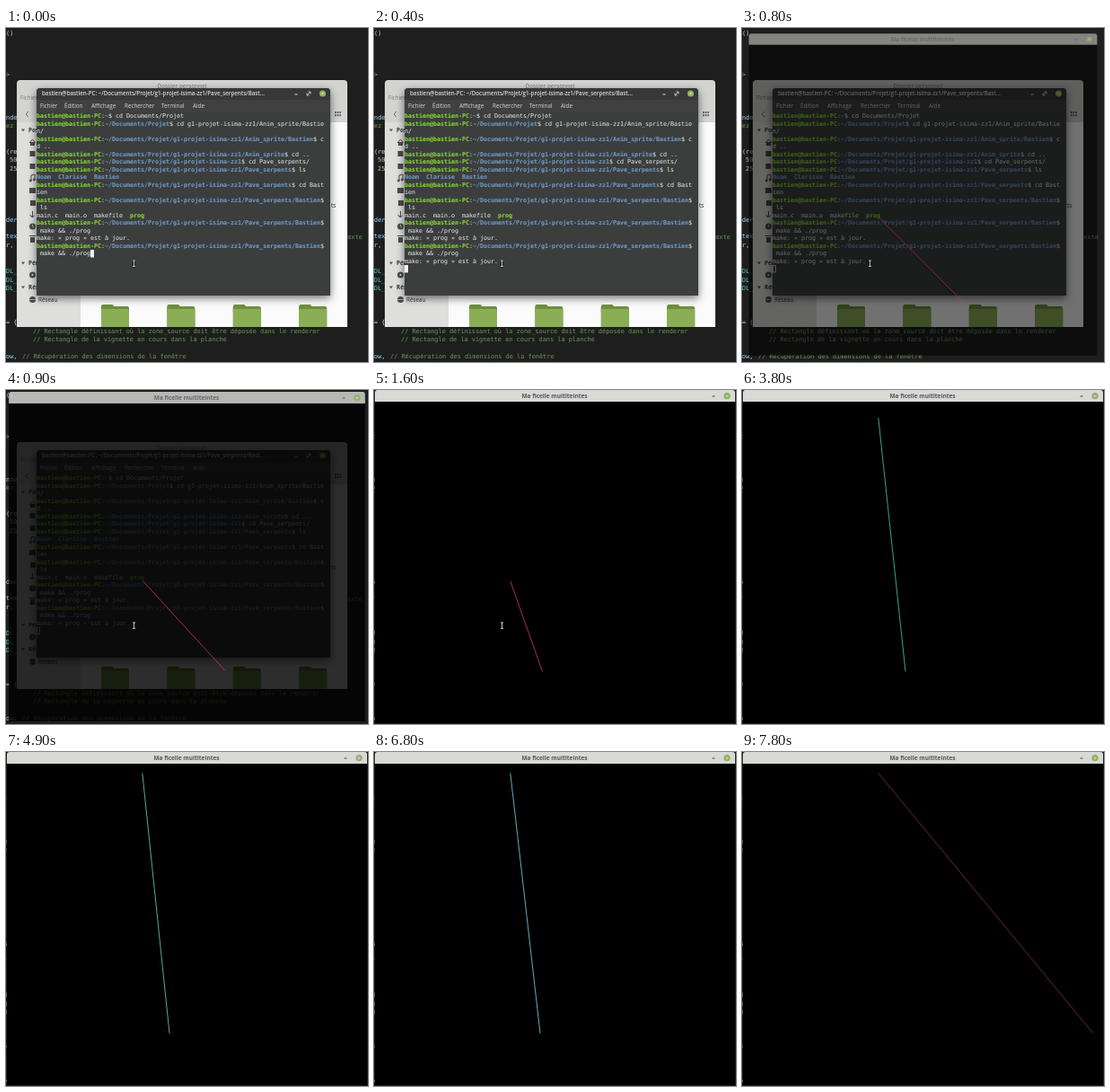
Write an HTML page with a canvas that moves like this. It is 403 by 372 pixels and loops after 8 s.

```html
<!DOCTYPE html>
<html lang="fr">
<head>
<meta charset="utf-8">
<title>Ma ficelle multiteintes</title>
<style>
html, body { margin: 0; width: 100%; height: 100%; overflow: hidden; background: #1e1e1e; }
canvas { display: block; width: 100vw; height: 100vh; }
</style>
</head>
<body>
<canvas id="stage"></canvas>
<script>
const W = 403, H = 372, LOOP = 8000, STEP = 100;
const canvas = document.getElementById('stage');
const ctx = canvas.getContext('2d');
const dpr = window.devicePixelRatio || 1;
canvas.width = Math.round(W * dpr);
canvas.height = Math.round(H * dpr);

const MONO = '"DejaVu Sans Mono", monospace';
const UI = '"Open Sans", sans-serif';
const WHITE = '#eeeeec', GREEN = '#8ae234', BLUE = '#729fcf';

function rect(x, y, w, h, color) {
  ctx.fillStyle = color;
  ctx.fillRect(x, y, w, h);
}

function panel(x, y, w, h, color, radii) {
  ctx.fillStyle = color;
  ctx.beginPath();
  ctx.roundRect(x, y, w, h, radii);
  ctx.fill();
}

function disc(x, y, r, color) {
  ctx.fillStyle = color;
  ctx.beginPath();
  ctx.arc(x, y, r, 0, Math.PI * 2);
  ctx.fill();
}

function stroke(points, color, width = 1) {
  ctx.strokeStyle = color;
  ctx.lineWidth = width;
  ctx.beginPath();
  points.forEach(([x, y]) => ctx.lineTo(x, y));
  ctx.stroke();
}

function label(str, x, y, color, font, align = 'left') {
  ctx.font = font;
  ctx.fillStyle = color;
  ctx.textAlign = align;
  ctx.textBaseline = 'middle';
  ctx.fillText(str, x, y);
}

// Piecewise linear value from [time, value...] keys
function track(keys, t) {
  let i = 0;
  while (i < keys.length - 1 && keys[i + 1][0] <= t) i++;
  const a = keys[i], b = keys[i + 1] || a;
  const k = b === a ? 0 : Math.max(0, (t - a[0]) / (b[0] - a[0]));
  return a.slice(1).map((v, n) => v + (b[n + 1] - v) * k);
}

function closeButton(x, y, color) {
  disc(x, y, 3.6, color);
  stroke([[x - 1.2, y - 1.2], [x + 1.2, y + 1.2]], '#f4f4f0', 0.7);
  stroke([[x + 1.2, y - 1.2], [x - 1.2, y + 1.2]], '#f4f4f0', 0.7);
}

function drawEditor() {
  rect(0, 0, W, H, '#1e1e1e');
  const code = [
    ['()', 0, 6, '#d4d4d4'], ['>', 0, 52, '#ce9178'],
    ['nde', 0, 100, '#9cdcfe'], ['ez', 0, 109, '#6a9955'],
    ['(re', 0, 138, '#d4d4d4'], ['50', 4, 147, '#b5cea8'], ['25', 4, 157, '#b5cea8'],
    ['der', 0, 214, '#9cdcfe'], ['tex', 0, 232, '#9cdcfe'], ['r,', 0, 242, '#9cdcfe'],
    ['DL_', 0, 271, '#4ec9b0'], ['DL_', 0, 281, '#4ec9b0'], ['DL_', 0, 290, '#4ec9b0'],
    ['texte', 376, 233, '#6a9955'], ['= {', 0, 328, '#d4d4d4'],
    ['// Rectangle définissant où la zone_source doit être déposée dans le renderer', 30, 338, '#6a9955'],
    ['// Rectangle de la vignette en cours dans la planche', 30, 347, '#6a9955'],
    ['ow,', 0, 366, '#9cdcfe'],
    ['// Récupération des dimensions de la fenêtre', 18, 366, '#6a9955']
  ];
  for (const [str, x, y, color] of code) label(str, x, y, color, '6.9px ' + MONO);
}

function drawFiles() {
  panel(12, 58, 368, 275, '#d3d3d1', [4, 4, 0, 0]);
  label('Dossier personnel', 196, 65, '#8a8a8a', '600 6.3px ' + UI, 'center');
  label('Fichier', 16, 78, '#777', '6.2px ' + UI);
  rect(12, 105, 71, 228, '#dededd');
  rect(83, 105, 297, 228, '#fbfbfb');
  for (let i = 0; i < 6; i++) rect(366 + i % 3 * 2.6, 93 + (i > 2) * 3.2, 1.6, 2, '#555');
  stroke([[25, 93], [22, 96], [25, 99]], '#666');
  label('ts', 362, 198, '#333', '6.3px ' + UI);

  [[114, 'Poste'], [262, 'Périphériques'], [289, 'Réseau']].forEach(([y, name]) => {
    ctx.fillStyle = '#555';
    ctx.beginPath();
    ctx.moveTo(17, y - 1.5);
    ctx.lineTo(21, y - 1.5);
    ctx.lineTo(19, y + 1.5);
    ctx.fill();
    label(name, 25, y, '#333', '700 6.3px ' + UI);
  });

  const dark = '#4b4b4b';
  stroke([[26, 128], [29.5, 124], [33, 128]], dark);
  rect(27, 127, 5, 4, dark);
  rect(26.5, 137, 6, 6, dark);
  rect(26.5, 151, 6, 6, dark);
  stroke([[28, 170], [28, 164], [32, 163], [32, 169]], dark);
  disc(27.3, 170, 1.4, dark);
  disc(31.3, 169, 1.4, dark);
  rect(26, 178, 7, 6, dark);
  rect(27, 192, 6, 6, dark);
  stroke([[29.5, 204], [29.5, 211], [27, 208.5], [29.5, 211], [32, 208.5]], dark);
  disc(29.5, 221, 3.5, dark);
  stroke([[29.5, 219], [29.5, 221], [31, 222]], '#dededd', 0.7);
  rect(27, 233, 5, 6, dark);
  rect(26, 231, 7, 1, dark);
  disc(29.5, 275, 3.5, dark);
  disc(29.5, 275, 1, '#dededd');
  disc(29.5, 302.5, 3.5, dark);
  stroke([[26, 302.5], [33, 302.5]], '#dededd', 0.6);
  label('Réseau', 36, 303, '#333', '6.3px ' + UI);

  for (let i = 0; i < 4; i++) {
    const x = 106 + i * 73.4;
    panel(x, 308, 14, 8, '#6f8f3d', [2, 2, 0, 0]);
    panel(x, 310, 31, 23, '#6f8f3d', [1, 2, 0, 0]);
    panel(x, 313, 31, 20, '#8aae56', [1, 1, 0, 0]);
  }
}

const COLS = 80, CELL = 4, ROW = 8.5;
const ROOT = '~/Documents/Projet', REPO = ROOT + '/g1-projet-isima-zz1', PAVE = REPO + '/Pave_serpents';
const command = (path, cmd) =>
  [['bastien@bastien-PC', GREEN, 1], [':', WHITE], [path, BLUE, 1], ['$ ' + cmd, WHITE]];
const result = [['make: « prog » est à jour.', WHITE]];
const session = [
  command('~', 'cd Documents/Projet'),
  command(ROOT, 'cd g1-projet-isima-zz1/Anim_sprite/Bastien/'),
  command(REPO + '/Anim_sprite/Bastien', 'cd ..'),
  command(REPO + '/Anim_sprite', 'cd ..'),
  command(REPO, 'cd Pave_serpents/'),
  command(PAVE, 'ls'),
  [['Noam  Clarisse  Bastien', BLUE, 1]],
  command(PAVE, 'cd Bastien'),
  command(PAVE + '/Bastien', 'ls'),
  [['main.c  main.o  makefile  ', WHITE], ['prog', GREEN, 1]],
  command(PAVE + '/Bastien', 'make && ./prog'),
  result,
  command(PAVE + '/Bastien', 'make && ./prog')
];

function drawShell(t) {
  const ran = t >= 400;
  const lines = ran ? [...session, result, []] : session;
  let row = 0, col = 0;
  lines.forEach((line, n) => {
    if (n) { row++; col = 0; }
    for (const [str, color, bold] of line) {
      for (const ch of str) {
        if (col === COLS) { row++; col = 0; }
        if (ch !== ' ') {
          label(ch, 34 + col * CELL, 98.3 + row * ROW, color, (bold ? 'bold ' : '') + '6.65px ' + MONO);
        }
        col++;
      }
    }
  });
  const x = 34 + col * CELL, y = 94 + row * ROW;
  if (t < 800) {
    rect(x, y, CELL, ROW, WHITE);
  } else {
    ctx.strokeStyle = WHITE;
    ctx.lineWidth = 0.7;
    ctx.strokeRect(x + 0.5, y + 0.5, CELL - 1, ROW - 1);
  }
}

function drawTerminal(t) {
  ctx.save();
  ctx.shadowColor = 'rgba(0,0,0,.55)';
  ctx.shadowBlur = 10 * dpr;
  ctx.shadowOffsetY = 3 * dpr;
  panel(34, 67, 327, 231, '#3c3e3e', [4, 4, 0, 0]);
  ctx.restore();
  panel(34, 67, 327, 13, '#383838', [4, 4, 0, 0]);
  rect(34, 80, 327, 13.5, '#404040');
  label('bastien@bastien-PC: ~/Documents/Projet/g1-projet-isima-zz1/Pave_serpents/Bast...',
    40, 73.5, '#d8d8d8', '600 6.2px ' + UI);
  const menu = [['Fichier', 38], ['Édition', 65], ['Affichage', 95], ['Rechercher', 132], ['Terminal', 173], ['Aide', 208]];
  for (const [name, x] of menu) label(name, x, 87, '#d8d8d8', '6.3px ' + UI);
  stroke([[321.5, 74], [324.5, 74]], '#ddd');
  stroke([[335, 75], [339, 71], [336.5, 71]], '#ddd', 0.8);
  stroke([[339, 71], [339, 73.5]], '#ddd', 0.8);
  stroke([[335, 72.5], [335, 75], [337.5, 75]], '#ddd', 0.8);
  closeButton(352.5, 73, '#8fb158');
  drawShell(t);
}

const endX = [[800, 252], [1600, 187.5], [1700, 187.5], [2600, 182], [6700, 182], [6800, 185], [7600, 391]];
const topY = [[1600, 213], [2600, 214], [3500, 214], [3800, 31], [4700, 31], [4900, 23.5]];
const hue = [
  [800, 205, 55, 100], [1600, 165, 48, 82], [1700, 165, 48, 82], [2300, 120, 75, 165],
  [3100, 75, 125, 190], [3800, 55, 165, 128], [4700, 55, 165, 128], [4900, 80, 172, 155],
  [5700, 80, 172, 155], [5800, 105, 168, 185], [6800, 105, 168, 185], [7200, 145, 110, 150],
  [7600, 120, 48, 60], [7700, 120, 48, 60], [7800, 102, 40, 46]
];
const opening = [[800, 0.55, 0.967], [900, 0.82, 0.989], [1000, 1, 1]];

function drawGame(t) {
  if (t < 800) return;
  const [alpha, scale] = track(opening, t);
  ctx.save();
  ctx.globalAlpha = alpha;
  ctx.translate(W / 2, H / 2);
  ctx.scale(scale, scale);
  ctx.translate(-W / 2, -H / 2);
  rect(1, 12, 401, 359, '#000');
  panel(1, 0, 401, 13, '#d9d9d6', [3, 3, 0, 0]);
  label('Ma ficelle multiteintes', 201, 7.2, '#555', '700 6.5px ' + UI, 'center');
  stroke([[376.5, 7], [379.5, 7]], '#444');
  closeButton(393, 6.7, t >= 2700 && t < 6000 ? '#9aa978' : '#8fb158');
  const [x] = track(endX, t), [y] = track(topY, t);
  stroke([[151.8, y], [x, 313.5]], `rgb(${track(hue, t).map(Math.round)})`);
  ctx.restore();
}

const pointerPath = [[2700, 170, 258], [3000, 388, 219], [3200, 388, 219], [3400, 390, 100]];

function drawPointer(t) {
  if (t < 2700) {
    for (const [color, w] of [['#000', 2], ['#ddd', 0.9]]) {
      stroke([[142.5, 259], [142.5, 265.5]], color, w);
      stroke([[141, 259], [144, 259]], color, w);
      stroke([[141, 265.5], [144, 265.5]], color, w);
    }
  } else if (t < 3500) {
    const [x, y] = track(pointerPath, t);
    const shape = [[0, 0], [0, 7.4], [1.7, 6], [2.8, 8.6], [4, 8], [2.9, 5.5], [5, 5.3]];
    ctx.beginPath();
    shape.forEach(([dx, dy]) => ctx.lineTo(x + dx, y + dy));
    ctx.closePath();
    ctx.fillStyle = '#fff';
    ctx.fill();
  }
}

function frame(now) {
  const t = Math.floor((now % LOOP) / STEP) * STEP;
  ctx.setTransform(canvas.width / W, 0, 0, canvas.height / H, 0, 0);
  drawEditor();
  drawFiles();
  drawTerminal(t);
  drawGame(t);
  drawPointer(t);
}

const start = performance.now();
function tick() {
  frame(performance.now() - start);
  requestAnimationFrame(tick);
}
tick();
</script>
</body>
</html>
```
